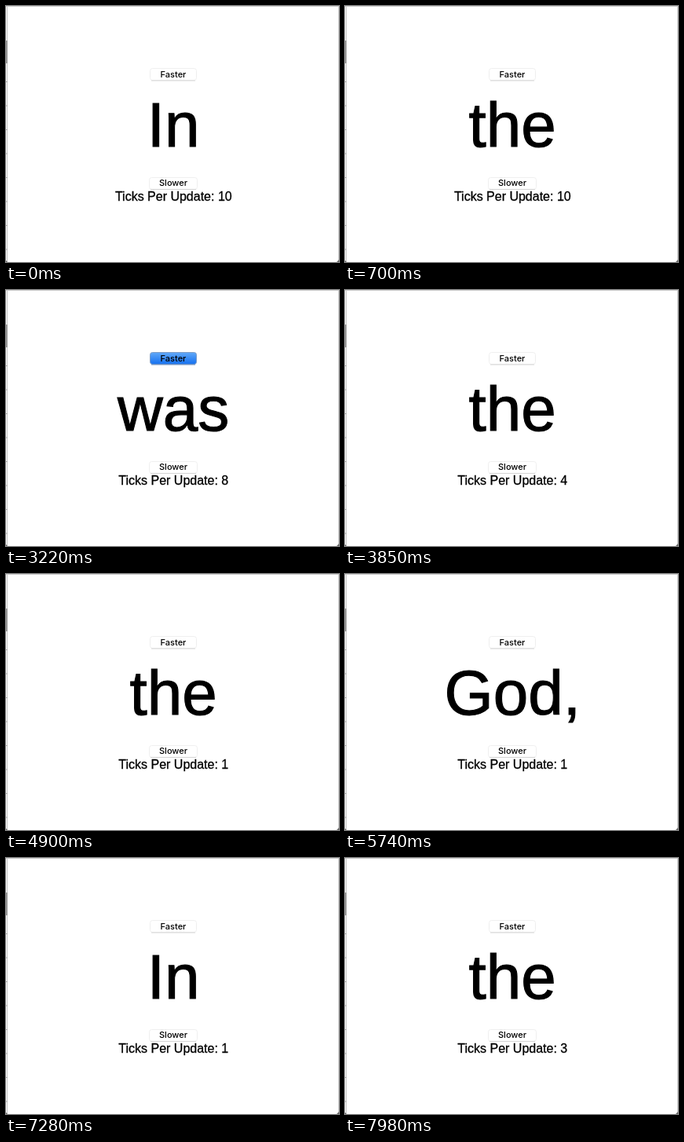
An HTML page for the animation above (8 s loop, 424 by 326 pixels).

```html
<!DOCTYPE html>
<html lang="en">
<head>
<meta charset="utf-8">
<title>Word reader</title>
<style>
  html, body { margin: 0; width: 100%; height: 100%; overflow: hidden; background: #fff; }
  svg { display: block; width: 424px; height: 326px; }
  text { text-anchor: middle; font-family: "Liberation Sans", Helvetica, Arial, sans-serif; stroke: #000; }
  #word { font-size: 80px; stroke-width: 1.1px; }
  #ticks { font-size: 16px; stroke-width: .3px; }
  .button text { font: 500 11px Inter, sans-serif; stroke: none; }
  .button rect { fill: #fff; stroke: #efefef; }
  .button path { stroke: #d4d4d4; }
  .button.down rect { fill: url(#blue); stroke: #7d9cc6; }
  .button.down path { stroke: #5f86bd; }
</style>
</head>
<body>
<svg viewBox="0 0 424 326">
  <defs>
    <linearGradient id="blue" x2="0" y2="1">
      <stop stop-color="#62a9f8"/>
      <stop offset="1" stop-color="#1470f0"/>
    </linearGradient>
    <pattern id="rows" y="96" width="2" height="30.5" patternUnits="userSpaceOnUse">
      <path d="M0 .5h2" stroke="#aaa"/>
    </pattern>
  </defs>
  <rect width="424" height="326" fill="#fff"/>
  <path d="M0 .5H424M423.5 0V326" stroke="#ccc"/>
  <path d="M1.5 1V326" stroke="#c4c4c4"/>
  <rect y="90" width="2" height="236" fill="url(#rows)"/>
  <rect y="44" width="2" height="29" fill="#999"/>
  <path d="M0 326v-2l2 2zM424 326v-3l-3 3z" fill="#666"/>
  <g class="button" id="faster">
    <rect x="183.5" y="79.5" width="59" height="15" rx="3"/>
    <path d="M185 95h56"/>
    <text x="213" y="91">Faster</text>
  </g>
  <text id="word" x="213.2" y="178.5"></text>
  <g class="button" id="slower">
    <rect x="182.5" y="218.5" width="61" height="15" rx="3"/>
    <path d="M184 233.5h58"/>
    <text x="213" y="229">Slower</text>
  </g>
  <text id="ticks" x="213.3" y="247.5"></text>
</svg>
<script>
const LOOP = 8000;
const words = 'In the beginning was the Word, and the Word was with God, and the Word was God. In the'.split(' ');
const wordTimes = [0, 560, 1890, 3010, 3780, 4340, 4690, 4900, 5110, 5320,
  5530, 5740, 5950, 6160, 6440, 6650, 6860, 7280, 7700];

// Each click is [press, release]; the counter changes on release.
const fasterClicks = [[2660, 2730], [2870, 2940], [3220, 3290], [3360, 3430], [3500, 3570],
  [3710, 3850], [4270, 4340], [4480, 4550], [4620, 4690]];
const slowerClicks = [[7490, 7560], [7770, 7840]];

const get = id => document.getElementById(id);
const setText = (id, value) => {
  if (get(id).textContent !== value) get(id).textContent = value;
};
const released = (clicks, t) => clicks.filter(([, up]) => t >= up).length;
const isDown = (clicks, t) => clicks.some(([down, up]) => t >= down && t < up);

function draw(now) {
  const t = now % LOOP;
  const index = wordTimes.filter(start => t >= start).length - 1;
  const count = 10 - released(fasterClicks, t) + released(slowerClicks, t);
  setText('word', words[index]);
  setText('ticks', `Ticks Per Update: ${count}`);
  get('faster').classList.toggle('down', isDown(fasterClicks, t));
  get('slower').classList.toggle('down', isDown(slowerClicks, t));
}

const start = performance.now();
function frame() {
  draw(performance.now() - start);
  requestAnimationFrame(frame);
}
frame();
</script>
</body>
</html>
```
